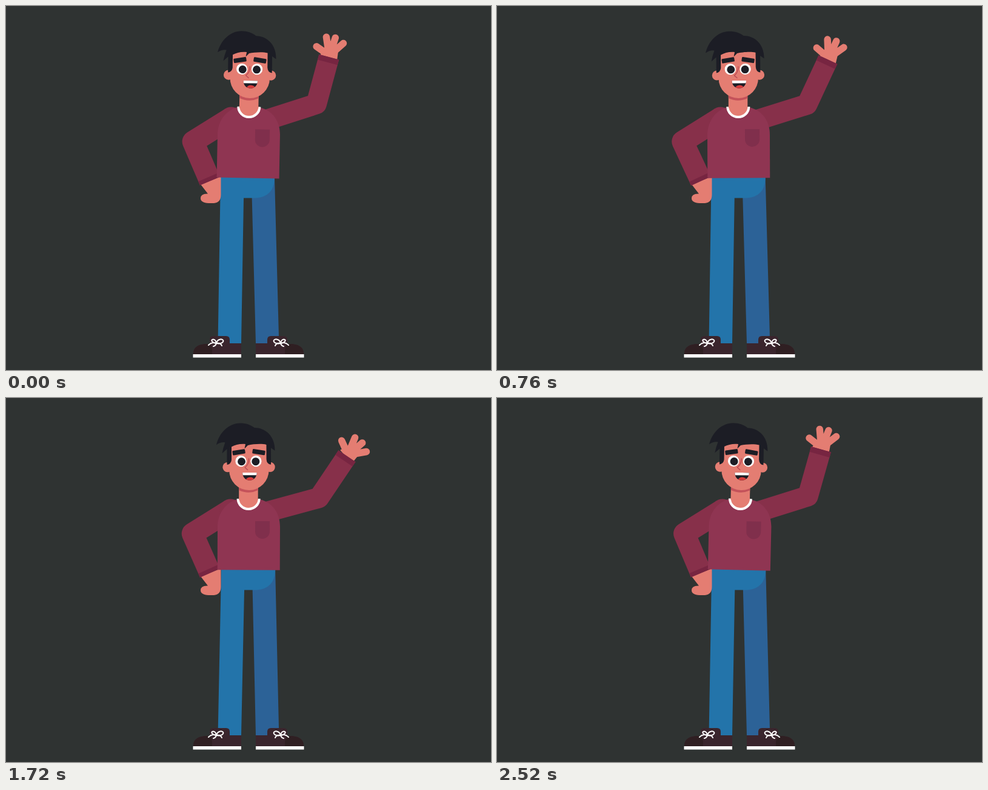
Recreate the animation shown at these times as an HTML page. Size 800x600 px, loop 2560 ms.

```html
<!DOCTYPE html>
<html lang="en">
<head>
<meta charset="utf-8">
<title>Waving man</title>
<style>
  html, body { margin: 0; height: 100%; overflow: hidden; background: #2f3332; }
  svg { display: block; width: 100vw; height: 100vh; }
  .skin { fill: #e47d72; }
  .dark { fill: #1c1d25; }
  .white { fill: #fff; }
  .line { fill: none; stroke-linecap: round; stroke-linejoin: round; }
  .sleeve { stroke: #87304a; }
  .cuff { fill: none; stroke: #772541; }
  .right { stroke-width: 34; }
  .left { stroke-width: 36; }
</style>
</head>
<body>
<svg viewBox="0 0 800 600">
  <defs>
    <clipPath id="mouth"><path d="M388 123H411.5C411.5 140 388 140 388 123Z"/></clipPath>
    <g id="shoe">
      <path fill="#3a252d" d="M309 575C308 562 318 556 336 557V550Q336 544 342 544H363Q369 544 369 550V556H388V575Z"/>
      <path fill="#2f1f22" d="M309 575C308 562 318 556 336 557Q341 563 340 575Z"/>
      <path class="white" d="M308.500 574H388V579.500H308.500Z"/>
      <path class="line" stroke="#fff" stroke-width="2" d="M334 559Q340 553 347 556C341 556 336 550 342 549.500Q346 550 347 556C349 548 358 548 358.500 552C358 556 352 557 347 556Q346 560 342 561M347 556Q354 555 356 560"/>
    </g>
  </defs>

  <g id="hand">
    <path class="skin" d="M-15 2L-11 -16Q0 -22 11 -16L14.500 2Z"/>
    <path class="line" stroke="#e47d72" stroke-width="11.500" d="M-25 -10L-8 -5M-14.500 -30L-6 -13M0 -33.400V-13M15.400 -29L6 -13"/>
  </g>
  <path id="rightSleeve" class="line sleeve right" style="stroke-linecap:butt"/>
  <path id="rightCuff" class="cuff right"/>

  <g id="legs">
    <path fill="#2c6297" d="M400 283H443.400L450.300 556H412L406 316Z"/>
    <path fill="#2374aa" d="M354.400 280H443.400V285Q442 314 413 316.500H392.400L388 556H349.500Z"/>
  </g>
  <use href="#shoe"/>
  <use href="#shoe" transform="matrix(-1 0 0 1 800 0)"/>

  <path class="skin" d="M321 294L333 309.500Q321 309 321 317Q321 324 334 325H343Q354.500 324 354.500 311V281Z"/>
  <path id="leftSleeve" class="line sleeve left" style="stroke-linecap:butt"/>
  <circle id="leftShoulder" r="18" fill="#87304a"/>
  <path id="leftCuff" class="cuff left"/>

  <g id="body">
    <path fill="#8f3552" d="M380 166.500L374 169C358 176 347 192 347 213V283.500H450V212C450 190 438 172 416 167Z"/>
    <path fill="#802f4c" d="M409 203H433V220A12 12 0 0 1 409 220Z"/>
    <path class="skin" stroke="#fff" stroke-width="4" d="M380.500 166A17.500 17 0 0 0 415.500 166"/>
    <path class="skin" d="M382 140H413.500V168H382Z"/>
    <path fill="#c4525a" d="M382 144H413.500V152Q398 159.500 382 152Z"/>
    <g transform="rotate(-.4 398 150)">
      <circle class="skin" cx="363.500" cy="114" r="8.200"/>
      <circle class="skin" cx="433.500" cy="114" r="8.200"/>
      <path class="skin" d="M366 72H431.500V119A32.750 33 0 0 1 366 119Z"/>
      <path class="dark" d="M345 77C350 57 365 42 384 41.500C394 41.500 401 44 408 49C425 49 442 62 441.500 87L435 82.500V110Q428 109 427.500 101V77C420 75 405 76 397 78L391.500 83.500L393 76C385 75 376 77 370 80.500V102Q369 109 362.500 110V84L354.500 91Q356 82 359.500 73Q352 72 345 77Z"/>
      <rect class="dark" x="371.500" y="85.500" width="21" height="7.500" rx="1.500" transform="rotate(-9 382 89)"/>
      <rect class="dark" x="404.500" y="85.500" width="21" height="7.500" rx="1.500" transform="rotate(9 415 89)"/>
      <circle class="white" cx="385.500" cy="104" r="9.200"/>
      <circle class="white" cx="410.300" cy="104" r="9.200"/>
      <circle class="dark" cx="386.500" cy="104.700" r="6.500"/>
      <circle class="dark" cx="409.800" cy="104.700" r="6.500"/>
      <path class="line" stroke="#bd4c55" stroke-width="1.500" d="M398.500 100Q399 109 392 114.500L396.500 118.500"/>
      <g clip-path="url(#mouth)">
        <path class="dark" d="M386 122H413V140H386Z"/>
        <path class="white" d="M386 122H413V127.300H386Z"/>
        <ellipse cx="400.500" cy="135.500" rx="7" ry="5" fill="#d63c3c"/>
      </g>
    </g>
  </g>
</svg>
<script>
const PERIOD = 640, STEP = 40;
const $ = id => document.getElementById(id);
const set = (id, name, value) => $(id).setAttribute(name, value);

// Sleeve through shoulder, elbow and wrist, with a band at the wrist end
function drawArm(side, shoulder, elbow, wrist, band) {
  const dx = wrist[0] - elbow[0], dy = wrist[1] - elbow[1];
  const k = band / Math.hypot(dx, dy);
  set(side + 'Sleeve', 'd', `M${shoulder}L${elbow}L${wrist}`);
  set(side + 'Cuff', 'd', `M${wrist}l${-dx * k},${-dy * k}`);
}

function draw(time) {
  const t = Math.floor(time / STEP) * STEP;
  const wave = peak => Math.cos((t - peak) / PERIOD * 2 * Math.PI);

  const hip = 0.75 * wave(420);
  const sway = wave(565);
  set('legs', 'transform', `matrix(1 0 ${-hip / 273} 1 ${hip * 556 / 273} 0)`);
  set('body', 'transform', `translate(${hip + 1}) rotate(${1.31 * wave(584)} 398.5 283)`);

  const leftShoulder = [369.5 + 2.5 * sway, 184.5];
  set('leftShoulder', 'cx', leftShoulder[0]);
  set('leftShoulder', 'cy', leftShoulder[1]);
  drawArm('left', leftShoulder, [307 + 2.2 * sway, 223.5], [336.5, 288.5], 7);

  const swing = wave(312);
  const tilt = 29.5 + 14.5 * swing;
  const angle = tilt * Math.PI / 180;
  const length = 82.2 + 2.2 * swing;
  const elbow = [513.8 + 2.5 * wave(400), 163.4 + 2 * wave(340)];
  const wrist = [elbow[0] + length * Math.sin(angle), elbow[1] - length * Math.cos(angle)];
  drawArm('right', [430, 187.8], elbow, wrist, 9);
  set('hand', 'transform', `translate(${wrist}) rotate(${tilt + 7.3 + 8 * wave(425)})`);
}

function loop() {
  draw(performance.now());
  requestAnimationFrame(loop);
}
loop();
</script>
</body>
</html>
```
